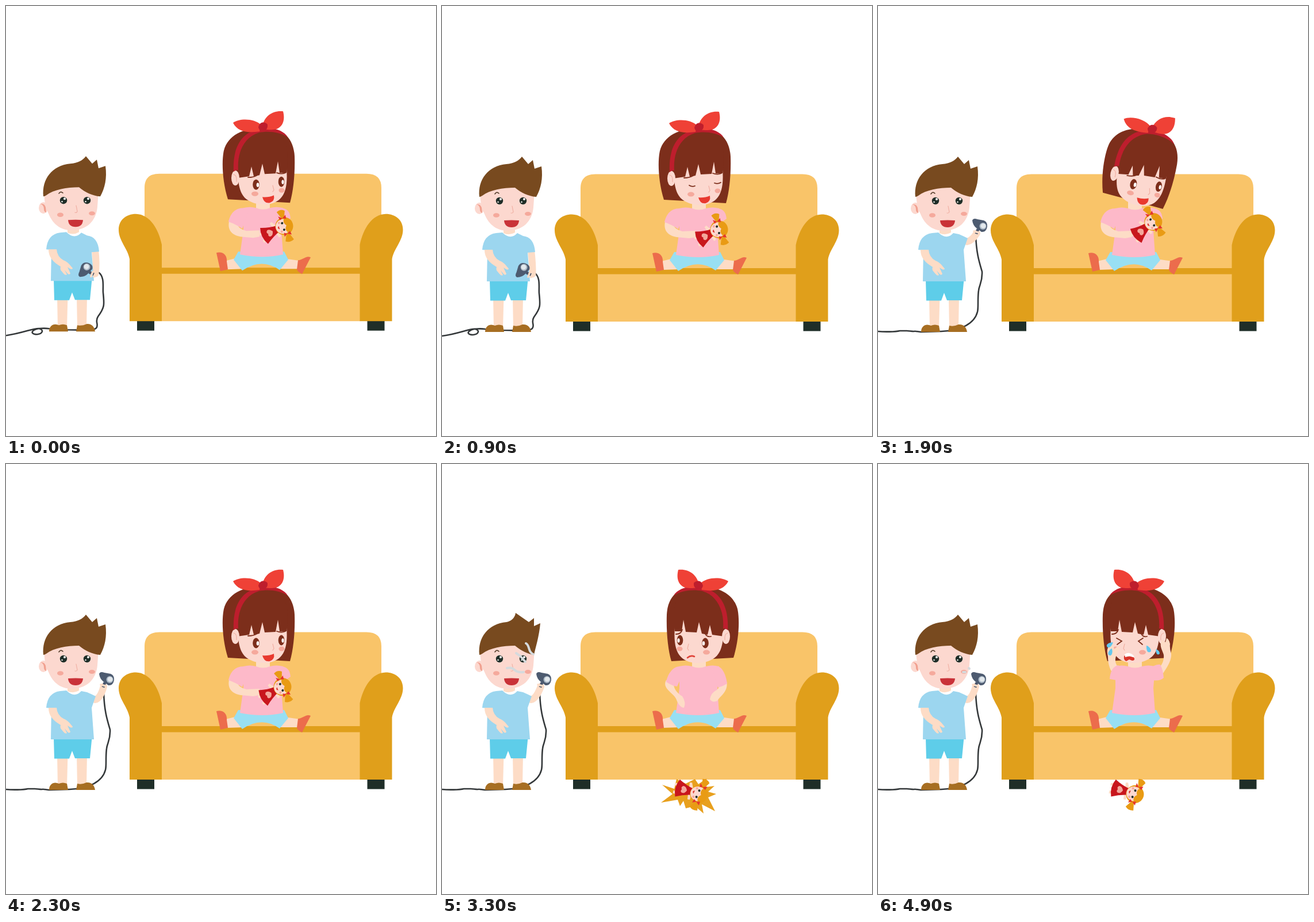
Write an HTML page that moves like this. It is 748 px wide and 748 px high and loops after 5100 ms.

```html
<!DOCTYPE html>
<html lang="en">
<head>
<meta charset="utf-8">
<title>Boy with a hair dryer</title>
<style>
html, body { margin: 0; width: 100%; height: 100%; overflow: hidden; background: #fff; }
svg { display: block; width: 100vw; height: 100vh; }
.face { fill: #fcd8cf; }
.skin { fill: #fddcc6; }
.hair { fill: #7c2e1b; }
.red { fill: #ef4136; }
.band { fill: #be1e2d; }
.pink { fill: #fdb9c9; }
.blush { fill: #f5a99c; }
.gold { fill: #e09f1b; }
.dark { fill: #1f2e28; }
.line { fill: none; stroke: #7c2e1b; stroke-width: 1.8; stroke-linecap: round; }
.nose { fill: none; stroke: #f0b0a4; stroke-width: 1.2; stroke-linecap: round; }
.tear { fill: #62c8ef; }
.wisp { fill: none; stroke: #d5dadd; stroke-width: 4; stroke-linecap: round; }
</style>
</head>
<body>
<svg viewBox="0 0 748 748">
  <defs>
    <g id="side">
      <path class="dark" d="M228 547H258V565.500H228Z"/>
      <path class="gold" d="M215 549V441C212 423 196 409 196 390C196 373 209 362.500 226 362.500C250 363 265 388 271 416V549Z"/>
    </g>
    <path id="drop" class="tear" d="M0-7C5-2 5 6 1 6C-4 6-4 0 0-7Z"/>
  </defs>
  <g id="scene">
    <path fill="#f9c469" d="M241 470V317Q241 292.500 267 292.500H627Q653 292.500 653 317V470H616V549H271V470Z"/>
    <path class="gold" d="M265 456H620V466.500H265Z"/>
    <use href="#side"/>
    <use href="#side" transform="matrix(-1 0 0 1 886.500 0)"/>

    <!-- boy -->
    <path id="cable" fill="none" stroke="#34383a" stroke-width="2.6"/>
    <path class="skin" d="M89 505H107.500L106 560H90ZM123 505H141L140 560H124Z"/>
    <path fill="#a76e22" d="M75 567C75 556 84 552 92 556Q99 553 106 556L108 567ZM122 567L124 556Q132 558 140 554C149 553 154 559 155 567Z"/>
    <path fill="#5ecde9" d="M83 476H149.500L146 512H120L115 499L110 512.500H84Z"/>
    <path id="forearm" fill="none" stroke="#fddcc6" stroke-width="12" stroke-linecap="round"/>
    <path id="shirt" fill="#9cd6ef"/>
    <path class="skin" d="M74 424H88Q89 437 100 443C108 446 112 452 116 457Q115 460 110 457L107 455L112 466Q110 469 107 466L102 460L106 468Q103 470 100 466L95 460Q94 457 95 454C82 446 74 438 74 424Z"/>
    <path class="skin" d="M107 385H127V394Q117 400 107 395Z"/>
    <ellipse class="face" cx="65" cy="352" rx="8" ry="10"/>
    <path fill="#f1a08f" d="M60 345Q67 344 69 351L70 360Q66 359 66 354Q66 347 60 345Z"/>
    <path class="face" d="M66 325C67 340 68 351 74 362C82 382 97 391 114 391C140 391 157 375 159 350L161 322L120 296Z"/>
    <path id="boyHair" fill="#784a1f"/>
    <path fill="none" stroke="#4a3320" stroke-width="1.500" stroke-linecap="round" d="M92 327Q95 322 99 326"/>
    <g id="boyEyes"></g>
    <ellipse class="blush" cx="94.500" cy="364" rx="5.500" ry="3.800"/>
    <ellipse class="blush" cx="149.500" cy="361.500" rx="5.500" ry="3.500"/>
    <path class="nose" d="M122 348L124 358Q123 361 120 360"/>
    <path fill="#c93238" d="M108 373Q121 372 134 373Q133 385 121 385Q109 385 108 373Z"/>
    <path id="wisps" class="wisp"/>
    <g id="dryer">
      <path fill="none" stroke="#46536a" stroke-width="5" d="M-3 7L-7 18"/>
      <path fill="#4d5b70" d="M-13-8Q-11-13-4-10L7-8Q14-5 13 3Q11 13 3 12L-5 6Q-12 1-13-8Z"/>
      <circle cx="5.500" cy="2" r="6" fill="#aebbc8"/><circle cx="6" cy="1.500" r="4.300" fill="#e3e9ed"/>
      <path fill="none" stroke="#fddcc6" stroke-width="3.500" stroke-linecap="round" d="M-10 11L-2 13M-10 16L-4 18"/>
    </g>

    <!-- girl -->
    <path class="skin" d="M382 444L402 439L414 458L384 459ZM484 440L511 444L507 458L477 458Z"/>
    <path fill="#ec6c4c" d="M366 430C378 427 385 435 384 445L386 459L373 462ZM508 443C516 443 522 434 530 438L515 467Q507 463 506 459Z"/>
    <path fill="#98dff3" d="M404 428L396 442L411 461Q445 438 476 460L491 442L484 428Z"/>
    <path class="skin" d="M435 340H459V358H435Z"/>
    <path class="pink" d="M413 352Q424 349 435 352Q447 357 459 352Q470 349 482 352L479 390L482 433Q447 441 407 433L413 390Z"/>
    <g id="hold">
      <path class="skin" d="M389 372C384 388 391 399 408 402L430 404L441 402V391L418 392C408 389 403 386 403 378Z"/>
      <path class="pink" d="M414 352C396 352 390 364 387 376Q399 380 411 388L422 358ZM480 352C492 354 494 362 495 370L478 382L470 358Z"/>
    </g>
    <g id="low">
      <path class="skin" d="M390 376C382 390 402 398 407 408Q413 424 421 424Q425 415 418 404C409 399 402 390 403 380ZM484 379L495 378C499 396 483 404 479 412Q470 416 466 409Q468 398 478 393Q484 388 484 379Z"/>
      <path class="pink" d="M414 352C400 352 392 368 390 379Q400 386 409 387L422 358ZM480 352C490 355 495 372 496 382Q488 387 480 389L470 358Z"/>
    </g>

    <g id="head">
      <path class="hair" d="M386 337C376 305 375 270 379 252C386 226 412 213 445 213C475 211 500 225 502 262C503 292 500 322 494 343L440 340Z"/>
      <path class="face" d="M404 280C402 315 409 331 420 338C434 348 463 350 477 336C489 324 491 302 486 265L440 250Z"/>
      <path class="hair" d="M396 296C397 260 410 222 447 219C484 218 495 242 488 291L476 291L473 271L469 292L450 293L446 275L441 295L431 297L427 280L423 297L402 300Z"/>
      <ellipse class="face" cx="399" cy="300" rx="7" ry="13"/>
      <path class="nose" d="M396 294Q402 295 401 306"/>
      <path class="band" d="M396 289C394 250 407 219 445 214C466 211 484 218 490 229C475 219 455 218 440 221C411 230 402 260 404 286Q399 286 396 289Z"/>
      <path class="red" d="M395 204C406 196 432 196 444 208L441 219C421 222 403 220 395 204ZM446 209C450 192 464 182 482 184C486 200 481 211 470 215C460 217 452 215 448 216Z"/>
      <path class="band" d="M439 212C441 201 451 202 455 207Q456 216 448 218Q442 221 439 212Z"/>
      <ellipse class="blush" cx="433" cy="327.500" rx="6" ry="4"/>
      <ellipse class="blush" cx="479.500" cy="321.500" rx="5" ry="4"/>
      <path class="nose" d="M464 313L466 321L464 324"/>
      <g id="eyes">
        <ellipse class="hair" cx="435" cy="311.500" rx="5.800" ry="9"/><ellipse cx="438" cy="312" rx="2.300" ry="3.800" fill="#fff"/>
        <ellipse class="hair" cx="479" cy="306.500" rx="5.300" ry="9"/><ellipse cx="481.500" cy="307" rx="2.100" ry="3.700" fill="#fff"/>
      </g>
      <path id="lids" class="line" d="M430 312Q435 315 440 313M474 308Q480 310 485 307"/>
      <g id="happy">
        <path class="line" d="M421 299Q431 299 437 295M471 291Q479 294 486 291"/>
        <path fill="#e8392f" d="M446 333Q457 334 466 330Q468 340 459 343Q449 345 446 333Z"/>
      </g>
      <path id="worry" class="line" d="M425 300Q433 302 436 293M475 288Q477 296 486 296"/>
      <path id="frown" fill="none" stroke="#e0443a" stroke-width="2.600" stroke-linecap="round" d="M454 335Q460 332 466 337"/>
      <g id="cry">
        <path class="line" d="M432 303L440 308L433 314M478 303L469 308L477 314"/>
        <path fill="#d9342b" d="M447 338Q456 327 465 334Q466 342 461 343L456 340L451 342Q446 342 447 338Z"/>
        <path fill="#fff" d="M447 335Q455 325 464 331L463 336Q455 333 450 336Z"/>
      </g>
    </g>
    <g id="up">
      <path class="skin" d="M408 312C397 318 398 326 400 335C400 347 403 356 407 362L418 354C410 344 413 336 416 330Q422 319 417 317L411 322ZM494 305C488 316 495 324 497 332C498 342 494 350 488 355L496 364C504 352 511 341 510 330Q507 320 508 313Q506 304 502 303L500 310Z"/>
      <path class="pink" d="M418 350C408 352 404 362 403 374L414 376L424 358ZM480 351Q487 348 491 349Q496 358 497 372Q490 378 478 376L470 358Z"/>
      <g id="tears">
        <use href="#drop" transform="translate(403 314) rotate(55)"/>
        <use href="#drop" transform="translate(404 327) rotate(20)"/>
        <use href="#drop" transform="translate(470 322) rotate(-25)"/>
        <use href="#drop" transform="translate(486 327) rotate(-25) scale(.8)"/>
      </g>
    </g>

    <path id="burst" fill="#e8a01e" d="M383 558L404 565L408 548L424 556L440 548L446 557L460 547L459 562L474 560L463 570L477 574L463 580L475 604L452 592L455 608L440 595L424 599L420 586L414 595L410 584L381 589L401 574Z"/>
    <g id="doll">
      <g transform="rotate(-12 -10 0)">
        <path class="skin" d="M-36-10L-44-8V-4L-36-5ZM-36 6L-44 5V10L-36 10ZM-18-4L-19-14L-15-15L-11-5ZM-18 4L-17 15L-13 15L-11 5Z"/>
        <path fill="#c8161d" d="M-10-5Q-24-8-37-16Q-45-1-39 15Q-24 8-10 6Z"/>
        <path fill="#f3a79b" d="M-21 0Q-24-7-29-6Q-33-3-30 0Q-33 4-29 6Q-24 7-21 0Z"/>
      </g>
      <path fill="#e99b14" d="M1-13L-4-27Q4-31 10-25L5-13ZM1 13L-5 26Q2 31 10 27L5 13Z"/>
      <circle r="15.500" cx="1" fill="#e99b14"/>
      <path class="face" d="M4-12C-6-15-14-8-14 0C-14 8-6 15 4 12Q-1 6 5 0Q0-6 4-12Z"/>
      <path fill="#e5352d" d="M2-14L-4-19L-3-12L2-14L9-18L8-11ZM2 14L-4 18L-3 11L2 14L9 18L8 11Z"/>
      <circle class="dark" cx="-1" cy="-6" r="2"/><circle class="dark" cx="-1" cy="6" r="2"/>
      <circle class="blush" cx="-6" cy="-8" r="2"/><circle class="blush" cx="-6" cy="8" r="2"/>
      <path fill="#d9342b" d="M-8-3Q-13 0-8 3Z"/>
    </g>
  </g>
</svg>
<script>
const $ = id => document.getElementById(id);
const show = (id, on) => $(id).style.display = on ? '' : 'none';
const set = (id, name, value) => $(id).setAttribute(name, value);

// Blend two paths that share the same commands.
function mix(a, b, k) {
  const end = b.match(/-?[\d.]+/g);
  let i = 0;
  return a.replace(/-?[\d.]+/g, n => +n + (end[i++] - n) * k);
}

const cable = [
  'M161 464C172 472 168 490 169 500C171 520 172 525 160 541C154 550 162 555 157 561C150 567 130 564 107 564L75 562C68 561 55 561 50 564C42 568 46 572 54 572C64 571 66 564 58 562C50 560 30 570 0 574',
  'M170 398C171 430 176 445 181 462C182 480 176 485 175 495C173 510 175 525 173 532C168 552 145 565 110 566L75 567C70 567 66 565 62 566C58 566 54 565 50 565C46 565 42 565 38 565C30 567 10 567 0 566'
];
const shirt = [
  'M94 395L105 394Q119 408 131 395L141 400Q160 402 162 428L149 429L153 479L78 479L79 425L70 424Q72 398 94 395Z',
  'M94 395L105 394Q119 408 131 395L141 397Q150 401 156 404L149 424L153 479L78 479L79 425L70 424Q72 398 94 395Z'
];
const tuft = {
  A: 'C125 274 134 269 139 262L150 275L158 268L161 283L173 279C176 300 172 318 164 332',
  B: 'C115 273 123 270 125 262Q131 272 147 275Q153 270 152 261Q160 270 161 283Q170 280 172 270C175 295 168 315 161 331',
  C: 'C118 274 127 269 128 259L151 275L160 268L160 282L171 277C169 300 163 318 160 332'
};
const wisps = {
  A: 'M148 362L152 362M158 355L159 356',
  B: 'M148 317C153 320 151 328 157 327M134 336L143 341L148 347M155 338L164 338M116 359Q124 365 130 362T144 366',
  C: 'M146 312C153 315 149 327 159 331M129 329L136 334L145 344M113 355Q121 353 126 358T142 362'
};

// Dryer pose while the arm rises: x, y, angle, raised share.
const lift = [[160, 440, -60, .3], [178, 420, -35, .55], [187, 395, -12, .85], [177, 381, 0, 1]];
const tilt = [0, 8, -5, 0, 6, 8, 8, 8, 12, 12];
const gusts = 'BABCBABACBCA';

function dollPose(s) {
  if (s > 14) return [446, 574, 24];
  if (s > 13) return [464, 443, 18];
  if (s > 11) return [467, 421, 8];
  if (s > 10) return [474, 402, -8];
  if (s > 9) return [480, 388, -22];
  if (s > 7) return [478, 376, -31];
  if (s > 4) return [482, 382, -25];
  return s % 2 ? [481, 389, -19] : [483, 384, -18];
}

function dryerPose(s, gust) {
  if (s < 5) return [s ? 140 : 138, 460, -84, 0];
  if (s < 9) return lift[s - 5];
  return [{ A: 175, B: 173, C: 177 }[gust], 373, 0, 1];
}

function draw(ms) {
  const s = ms < 500 ? 0 : 1 + Math.floor((ms - 500) / 200);
  const windy = s > 11, crying = s > 15;
  const gust = windy ? gusts[s - 12] : 'A';
  set('scene', 'transform', `translate(0 ${s ? 0 : -.8})`);

  const [x, y, turn, k] = dryerPose(s, gust);
  const r = turn * Math.PI / 180;
  const hx = x - 5 * Math.cos(r) - 14 * Math.sin(r);
  const hy = y - 5 * Math.sin(r) + 14 * Math.cos(r);
  set('dryer', 'transform', `translate(${x} ${y}) rotate(${turn})`);
  set('forearm', 'd', `M155 ${425 - 15 * k}Q${158 + 6 * k} ${450 - 42 * k} ${hx + 4 * (1 - k)} ${hy}`);
  set('shirt', 'd', mix(...shirt, k));
  const d = mix(...cable, k);
  const lifting = k > 0 && k < 1;
  set('cable', 'd', lifting ? d.replace(/^M[^C]+/, `M${hx} ${hy}`) : d);
  set('boyHair', 'd', 'M65 332C62 302 80 278 112 275' + tuft[gust] + 'C150 331 138 325 127 316C106 316 83 320 70 330Q67 332 65 332Z');
  show('wisps', windy);
  set('wisps', 'd', wisps[gust]);

  const angle = tilt[s] || 0;
  set('head', 'transform', windy ? 'matrix(-1 0 0 1 893 0)' : `rotate(${angle} 447 355)`);
  const shut = s > 1 && s < 5;
  show('eyes', !shut && !crying);
  show('lids', shut);
  show('happy', !windy);
  show('worry', windy);
  show('frown', windy && !crying);
  show('cry', crying);
  show('hold', s < 12);
  show('low', windy && !crying);
  show('up', crying);
  set('up', 'transform', `translate(0 ${s === 16 ? 5 : 0})`);
  show('tears', s > 16);
  set('tears', 'transform', `translate(0 ${s % 2 ? 0 : 3})`);

  const [dx, dy, spin] = dollPose(s);
  set('doll', 'transform', `translate(${dx} ${dy}) rotate(${spin})`);
  show('burst', s === 15);
}

$('boyEyes').innerHTML = [100, 141].map(x =>
  `<circle class="dark" cx="${x}" cy="339" r="6.2"/><circle cx="${x + 2}" cy="336" r="2" fill="#fff"/><circle cx="${x - 2.5}" cy="341" r="1.2" fill="#fff"/>`).join('');

function tick(now) {
  draw(now % 5100);
  requestAnimationFrame(tick);
}
draw(0);
requestAnimationFrame(tick);
</script>
</body>
</html>
```
